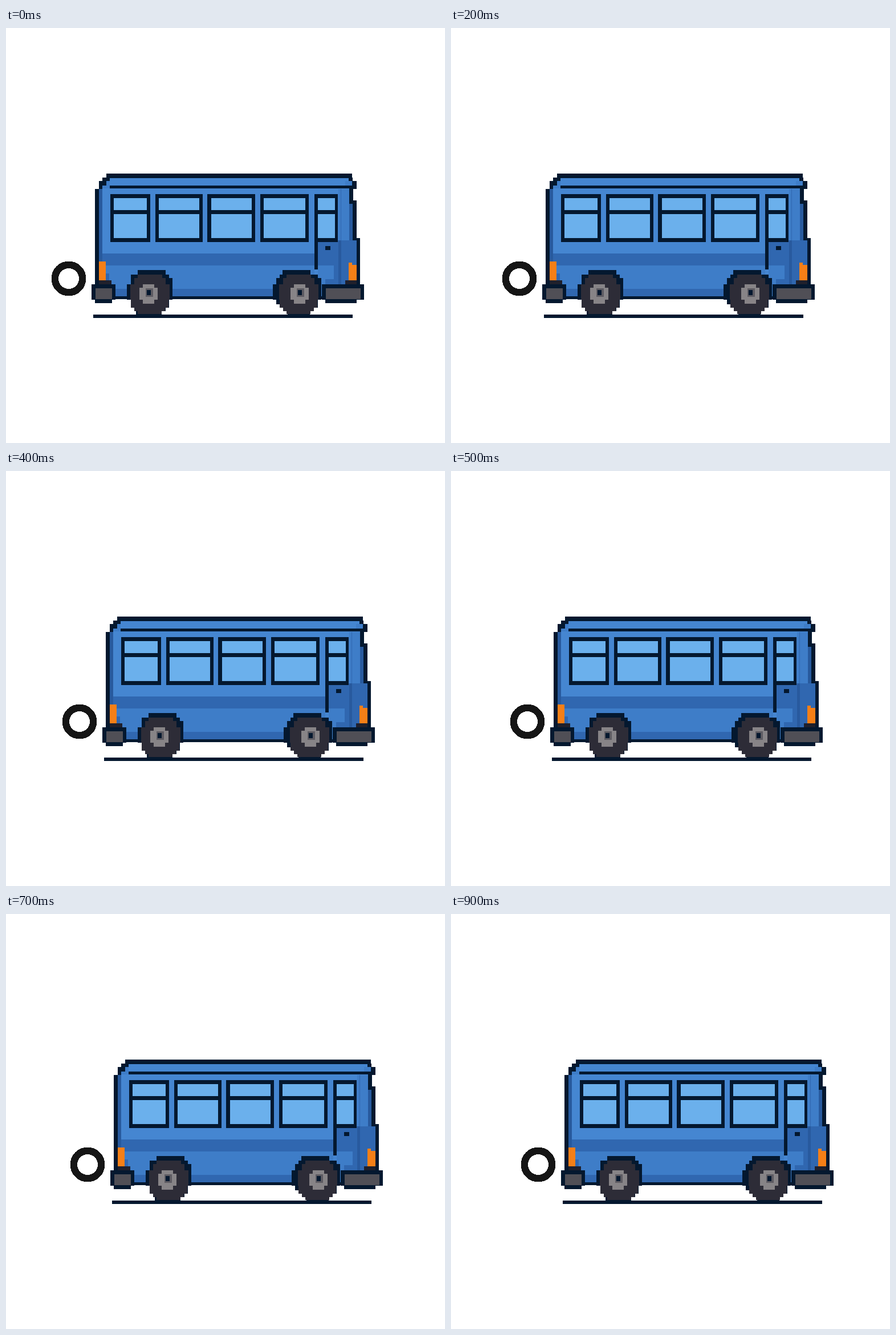
Animation of 770x727 px, one loop 1000 ms. Source, as an HTML page:

```html
<!DOCTYPE html>
<html lang="en">
<head>
<meta charset="utf-8">
<title>Bus</title>
<style>
  html, body { margin: 0; width: 100%; height: 100%; overflow: hidden; background: #fff; }
  svg { display: block; width: 770px; height: 727px; }
  .scene { animation: drive 1s step-end infinite; }
  /* whole-pixel steps keep the edges crisp */
  @keyframes drive {
    0% { transform: translateX(0); }
    10% { transform: translateX(5px); }
    20% { transform: translateX(10px); }
    30% { transform: translateX(14px); }
    40% { transform: translateX(19px); }
    50% { transform: translateX(24px); }
    60% { transform: translateX(29px); }
    70% { transform: translateX(33px); }
    80% { transform: translateX(38px); }
    90%, 100% { transform: translateX(43px); }
  }
  .ink { fill: #04182f; }
  .body { fill: #4586d1; }
  .low { fill: #3e7dc8; }
  .shade { fill: #3067b0; }
  .edge { fill: #285a9e; }
  .glass { fill: #6bb0ec; }
  .lamp { fill: #f57f17; }
  .dark { fill: #1f202c; }
  .metal { fill: #504f56; }
</style>
</head>
<body>
<svg viewBox="0 0 770 727" shape-rendering="crispEdges">
  <defs>
    <path id="tyre" fill="#2d2c37" d="M231 432H274V438H280V449H287V476H285V490H279V496H273V501H231V496H225V490H219V476H218V449H225V438H231Z"/>
    <g id="hub">
      <path fill="#878487" d="M240 449H260V455H266V476H260V483H240V476H234V455H240Z"/>
      <rect fill="#5d5b62" x="245" y="456" width="13" height="15"/>
      <rect class="ink" x="247" y="459" width="7" height="9"/>
    </g>
  </defs>

  <g class="scene">
    <circle cx="110" cy="439" r="24.2" fill="none" stroke="#151515" stroke-width="12.4"/>

    <!-- silhouette -->
    <path class="ink" d="M176 255H607V262H608V268H615V282H609V302H615V368H621V450H628V475H156V282H163V268H169V262H176Z"/>

    <!-- roof and body panels -->
    <path class="body" d="M182 263H601V268H607V276H182V281H602V470H192V450H169V276H176V268H182Z"/>
    <path class="low" d="M169 276H176V268H182V281H169ZM595 268H607V276H595Z"/>
    <path class="edge" d="M163 282H169V400H163ZM602 308H608V372H602Z"/>
    <path class="low" d="M583 282H602V372H583Z"/>
    <rect class="shade" x="587" y="282" width="1" height="90"/>
    <path class="low" d="M169 416H541V470H192V450H169Z"/>
    <rect class="shade" x="169" y="395" width="372" height="21"/>
    <path class="shade" d="M175 430H181V442H175ZM186 457H212V470H186ZM290 457H474V470H290Z"/>
    <path class="shade" d="M547 372H615V450H547Z"/>
    <path class="low" d="M547 416H575V440H560V450H547Z"/>
    <path class="edge" d="M583 372H588V450H583Z"/>
    <rect class="ink" x="182" y="276" width="433" height="5"/>

    <!-- windows -->
    <path class="ink" d="M183 291H253V375H183ZM262 291H345V375H262ZM353 291H437V375H353ZM446 291H531V375H446ZM541 291H582V375H547V423H541ZM560 382H569V389H560Z"/>
    <g class="glass">
      <path d="M189 298H247V319H189ZM268 298H339V319H268ZM360 298H431V319H360ZM452 298H525V319H452ZM547 298H577V319H547Z"/>
      <path d="M189 326H247V368H189ZM268 326H339V368H268ZM360 326H431V368H360ZM452 326H525V368H452ZM547 326H577V368H547Z"/>
    </g>

    <!-- lamps -->
    <rect class="edge" x="163" y="400" width="6" height="9"/>
    <rect class="lamp" x="163" y="409" width="12" height="33"/>
    <path class="lamp" d="M601 411H607V415H615V442H601Z"/>
    <path class="dark" d="M163 442H185V450H163ZM595 442H615V450H595Z"/>

    <!-- wheels -->
    <path class="ink" d="M231 424H280V432H286V438H292V476H286V490H280V496H273V502H228V496H225V490H219V476H212V449H219V432H231Z"/>
    <path class="ink" d="M485 424H534V432H547V438H553V476H547V490H540V496H533V502H494V496H487V490H480V484H474V476H468V449H474V438H480V432H485Z"/>
    <use href="#tyre"/>
    <use href="#tyre" x="261"/>
    <use href="#hub"/>
    <use href="#hub" x="265"/>

    <!-- bumpers -->
    <path class="ink" d="M150 449H192V476H186V482H156V476H150ZM554 449H628V476H615V482H560V476H554Z"/>
    <path class="metal" d="M157 456H186V475H157ZM561 456H622V475H561Z"/>

    <rect class="ink" x="153" y="502" width="455" height="6"/>
  </g>
</svg>
</body>
</html>
```
